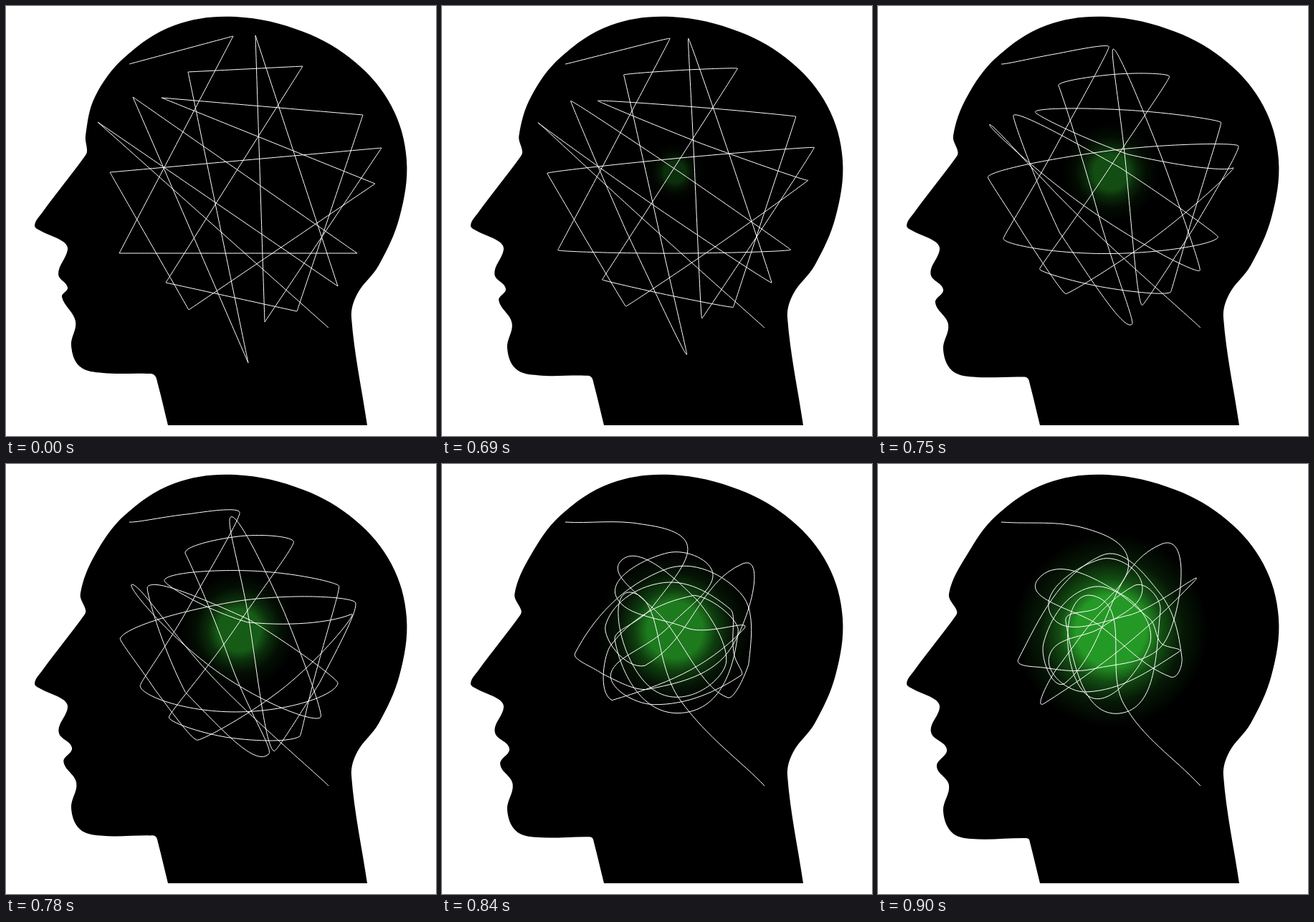
Recreate the animation shown at these times as an HTML page with a canvas. Size 600 by 600 pixels, loop 1800 ms.

```html
<!DOCTYPE html>
<html lang="en">
<head>
<meta charset="utf-8">
<style>
html, body { margin: 0; height: 100%; overflow: hidden; background: #fff; }
canvas { display: block; width: 600px; height: 600px; }
</style>
</head>
<body>
<canvas id="stage" width="600" height="600"></canvas>
<script>
const ctx = document.getElementById('stage').getContext('2d');
const LOOP = 1800, START = 630, STEP = 30, STEPS = 10;

// Corners of the zigzag
const corners = [
  [172,81], [317,42], [158,345], [490,345], [177,127], [338,498], [254,92],
  [414,84], [223,386], [406,426], [498,152], [217,128], [515,248], [255,424],
  [145,232], [524,198], [361,441], [348,41], [463,391], [128,162], [450,449]
];

// Key points of the tangle: each corner's end place, then the middle of its stroke
const tangle = [
  [172,81], [290,90],   [349,133], [310,198], [262,220], [337,348],
  [394,205], [357,170], [250,285], [232,334], [440,165], [350,211],
  [241,210], [310,133], [369,172], [315,226], [239,268], [290,318],
  [420,262], [395,250], [378,215], [297,172], [231,250], [262,305],
  [395,112], [402,245], [300,286], [230,284], [196,272], [311,128],
  [393,180], [424,270], [408,297], [310,226], [224,160], [345,185],
  [378,255], [290,321], [301,184], [343,335], [450,449]
];

// Profile: x, y and, where the face moves, its shift
const profile = [
  [226,585], [212,528], [207,515,3,8], [197,513,6,9], [135,512,-5,11],
  [103,503,0,11], [91,474,0,10], [97,440,2,8], [78,406,4,16], [86,393,10,5],
  [73,374,1,0], [86,340], [80,329], [47,313], [40,306], [50,289], [109,211],
  [113,203,-3,2], [111,181,-12,0], [124,127], [165,72], [235,27], [320,15],
  [415,36], [488,79], [538,140], [559,215], [549,295], [520,362], [490,402],
  [482,435], [504,585]
];

const lerp = (a, b, u) => a + (b - a) * u;

// Smooth nodes {x, y, in, out}: tangents follow the neighbours, lengths the chords
function smooth(pts) {
  return pts.map(([x, y], i) => {
    const p = pts[i - 1] || pts[i], n = pts[i + 1] || pts[i];
    const dx = n[0] - p[0], dy = n[1] - p[1], len = Math.hypot(dx, dy);
    const handle = (q, sign) => {
      const k = sign * 0.35 * Math.hypot(q[0] - x, q[1] - y) / len;
      return [dx * k, dy * k];
    };
    return { x, y, in: handle(p, -1), out: handle(n, 1) };
  });
}

// Straight strokes with a node in the middle of each
const zigzag = tangle.map((_, i) => {
  const a = corners[i >> 1], b = corners[(i + 1) >> 1];
  const d = [(b[0] - a[0]) / 4, (b[1] - a[1]) / 4];
  return { x: (a[0] + b[0]) / 2, y: (a[1] + b[1]) / 2, in: [-d[0], -d[1]], out: d };
});
const knot = smooth(tangle);

function blend(a, b, u) {
  const pair = (p, q) => p.map((v, i) => lerp(v, q[i], u));
  return a.map((n, i) => ({
    x: lerp(n.x, b[i].x, u), y: lerp(n.y, b[i].y, u),
    in: pair(n.in, b[i].in), out: pair(n.out, b[i].out)
  }));
}

function trace(nodes) {
  ctx.beginPath();
  ctx.moveTo(nodes[0].x, nodes[0].y);
  for (let i = 1; i < nodes.length; i++) {
    const a = nodes[i - 1], b = nodes[i];
    ctx.bezierCurveTo(a.x + a.out[0], a.y + a.out[1], b.x + b.in[0], b.y + b.in[1], b.x, b.y);
  }
}

function drawHead(u) {
  trace(smooth(profile.map(([x, y, dx = 0, dy = 0]) => [x + dx * u, y + dy * u])));
  ctx.closePath();
  ctx.fillStyle = '#000';
  ctx.fill();
}

function drawGlow(u) {
  const r = 135 * u;
  const g = ctx.createRadialGradient(325, 232, 0, 325, 232, r);
  for (const [at, alpha] of [[0, 1], [0.36, 1], [0.53, 0.5], [0.74, 0.16], [1, 0]]) {
    g.addColorStop(at, `rgba(37,153,37,${alpha * u})`);
  }
  ctx.fillStyle = g;
  ctx.fillRect(325 - r, 232 - r, 2 * r, 2 * r);
}

// Slow cubic start, quick settling end
const ease = u => u < 0.7 ? 1.3 * u ** 3 : 1 - 0.554 * ((1 - u) / 0.3) ** 2.5;

function drawThread(u) {
  trace(blend(zigzag, knot, ease(u)));
  ctx.strokeStyle = '#fff';
  ctx.lineWidth = 1;
  ctx.stroke();
}

function draw(t) {
  const step = t < START ? 0 : Math.min(STEPS, Math.floor((t - START) / STEP) + 1);
  const u = step / STEPS;
  ctx.fillStyle = '#fff';
  ctx.fillRect(0, 0, 600, 600);
  drawHead(u);
  if (u) drawGlow(u);
  drawThread(u);
}

const t0 = performance.now();
function tick() {
  draw((performance.now() - t0) % LOOP);
  requestAnimationFrame(tick);
}
tick();
</script>
</body>
</html>
```
